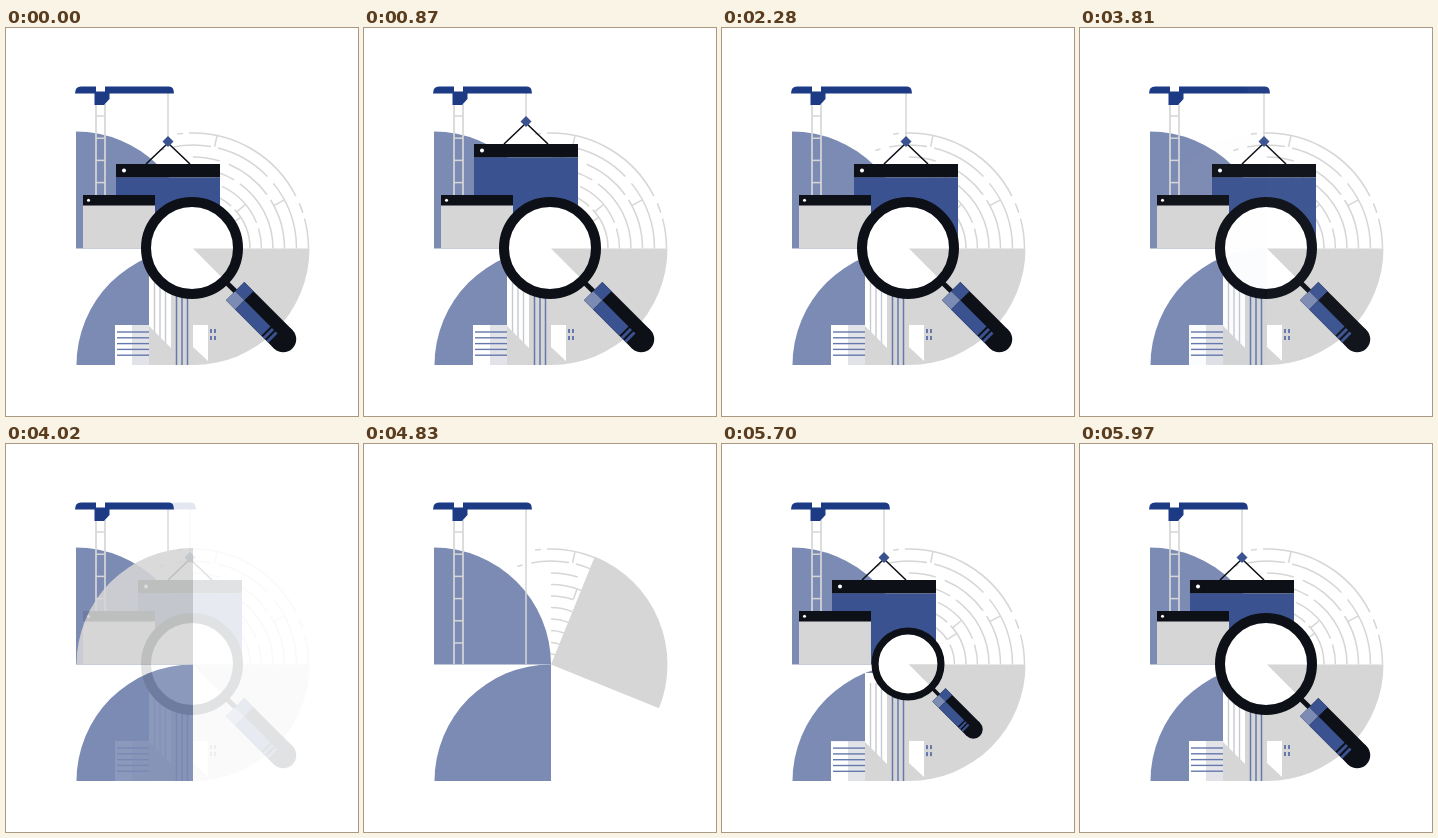
Recreate the animation shown at these times as an HTML page with a canvas. Size 352 by 388 pixels, loop 6.06 s.

```html
<!DOCTYPE html>
<html lang="en">
<head>
<meta charset="utf-8">
<title>Building site</title>
<style>
html, body { margin: 0; width: 100%; height: 100%; overflow: hidden; background: #fff; }
canvas { display: block; }
</style>
</head>
<body>
<canvas id="stage" width="352" height="388"></canvas>
<script>
const W = 352, H = 388, LOOP = 6060;
const PALE = '#7c8bb3', BLUE = '#3a5290', NAVY = '#1d3b85', INK = '#0e1018', GRAY = '#d6d6d6', WHITE = '#fff';
const HUB = { x: 187, y: 220.5 };
const DEG = Math.PI / 180;

const makeLayer = () => Object.assign(document.createElement('canvas'), { width: W, height: H }).getContext('2d');
const stage = document.getElementById('stage').getContext('2d');
const fading = makeLayer(), moving = makeLayer();

const clamp = v => Math.max(0, Math.min(1, v));
const span = (t, from, to) => clamp((t - from) / (to - from));
const smooth = p => (1 - Math.cos(Math.PI * p)) / 2;
const settle = p => smooth(1 - (1 - p) ** 2);
const mix = (a, b, p) => a + (b - a) * p;

function rect(c, color, x, y, w, h) {
  c.fillStyle = color;
  c.fillRect(x, y, w, h);
}

function poly(c, color, ...points) {
  c.fillStyle = color;
  c.beginPath();
  points.forEach(([x, y]) => c.lineTo(x, y));
  c.fill();
}

function line(c, color, width, ...points) {
  c.strokeStyle = color;
  c.lineWidth = width;
  c.beginPath();
  points.forEach(([x, y]) => c.lineTo(x, y));
  c.stroke();
}

function disc(c, color, x, y, r) {
  c.fillStyle = color;
  c.beginPath();
  c.arc(x, y, r, 0, 7);
  c.fill();
}

// Angles are degrees clockwise from straight up.
function sector(c, color, x, y, r, from, to) {
  c.fillStyle = color;
  c.beginPath();
  c.moveTo(x, y);
  c.arc(x, y, r, (from - 90) * DEG, (to - 90) * DEG);
  c.fill();
}

function clipped(c, x, y, w, h, draw) {
  c.save();
  c.beginPath();
  c.rect(x, y, w, h);
  c.clip();
  draw();
  c.restore();
}

const RINGS = [
  [115.5, [-8, -5], [-2, 63], [67, 72], [75, 90]],
  [103.5, [-19, -16], [-11, 10], [14, 46], [51, 90]],
  [91.5, [0, 17], [23, 54], [58, 90]],
  [80, [0, 31], [36, 90]],
  [68.5, [0, 19], [25, 68], [73, 90]],
  [57, [0, 42], [47, 90]],
  [45.5, [0, 57], [64, 90]],
  [34, [0, 35], [42, 90]],
  [22, [0, 90]],
  [10.5, [0, 30]]
];
const WALLS = [[104, 115, 12], [92, 103, 62], [69, 80, 19], [57, 68, 50], [46, 57, 57]];

function maze(c, limit) {
  c.strokeStyle = GRAY;
  c.lineWidth = 1.5;
  for (const [r, ...parts] of RINGS) {
    for (const [from, to] of parts) {
      if (from >= limit) continue;
      c.beginPath();
      c.arc(HUB.x, HUB.y, r, (from - 90) * DEG, (Math.min(to, limit) - 90) * DEG);
      c.stroke();
    }
  }
  for (const [inner, outer, angle] of WALLS) {
    if (angle > limit) continue;
    const s = Math.sin(angle * DEG), k = Math.cos(angle * DEG);
    line(c, GRAY, 1.5, [HUB.x + inner * s, HUB.y - inner * k], [HUB.x + outer * s, HUB.y - outer * k]);
  }
}

function mast(c) {
  for (const x of [90, 99]) line(c, GRAY, 1.7, [x, 76], [x, 220]);
  for (let i = 0; i < 6; i++) {
    const y = 88 + i * 22.2;
    line(c, GRAY, 1.5, [90, y], [99, y]);
  }
}

function jib(c, slide) {
  const end = 168 + slide;
  c.fillStyle = NAVY;
  c.beginPath();
  c.moveTo(69, 65.5);
  c.quadraticCurveTo(69, 58.5, 75, 58.5);
  c.lineTo(end - 5, 58.5);
  c.quadraticCurveTo(end, 58.5, end, 65.5);
  c.fill();
  rect(c, WHITE, 90, 57, 9, 6.5);
  poly(c, NAVY, [88.5, 65], [103.5, 65], [103.5, 71], [98, 77], [88.5, 77]);
}

function load(c, x, y) {
  line(c, INK, 1.6, [x - 22, y], [x, y - 21], [x + 22, y]);
  poly(c, BLUE, [x, y - 28], [x + 5.5, y - 22.5], [x, y - 17], [x - 5.5, y - 22.5]);
  rect(c, INK, x - 52, y, 104, 13.5);
  rect(c, BLUE, x - 52, y + 13.5, 104, 70.5);
  disc(c, WHITE, x - 44, y + 6.5, 2);
}

// Averages several positions so that a fast load smears along its path.
function smearedLoad(c, x, y, shift) {
  if (Math.abs(shift) < 1) return load(c, x, y);
  const n = 8;
  moving.clearRect(0, 0, W, H);
  moving.globalCompositeOperation = 'lighter';
  moving.globalAlpha = 1 / n;
  for (let i = 0; i < n; i++) load(moving, x, y + shift * (i / (n - 1) - .5));
  moving.globalAlpha = 1;
  moving.globalCompositeOperation = 'source-over';
  c.drawImage(moving.canvas, 0, 0);
}

function panel(c, y) {
  rect(c, GRAY, 77, y + 10, 72, 60);
  rect(c, INK, 77, y, 72, 10.5);
  disc(c, WHITE, 82.5, y + 5.3, 1.5);
}

function tower(c, y) {
  rect(c, WHITE, 143, y, 22, 130);
  rect(c, GRAY, 165, y, 22, 130);
  for (const x of [148.5, 154, 159.5]) line(c, '#c6c9d2', 1.4, [x, y + 10], [x, 337]);
  for (const x of [170.5, 176, 181.5]) line(c, '#6579ab', 1.5, [x, y + 10 + (x < 172 ? 7 : 0)], [x, 337]);
}

function houses(c, y) {
  poly(c, GRAY, [142, y], [166, y + 24], [166, y + 42], [142, y + 42]);
  rect(c, WHITE, 109, y, 17, 42);
  rect(c, '#e2e3e8', 126, y, 17, 42);
  for (let i = 0; i < 5; i++) line(c, '#6579ab', 1.4, [111, y + 7 + i * 5.8], [143, y + 7 + i * 5.8]);
  poly(c, WHITE, [187, y], [202, y], [202, y + 36], [187, y + 22]);
  for (const x of [204, 208]) for (const dy of [4, 11]) rect(c, '#6579ab', x, y + dy, 2, 4);
}

function magnifier(c, size) {
  if (size <= 0) return;
  c.save();
  c.translate(186, 220);
  c.scale(size, size);
  disc(c, WHITE, 0, 0, 46);
  sector(c, GRAY, 1, .5, 42, 90, 135);
  c.strokeStyle = INK;
  c.lineWidth = 10;
  c.beginPath();
  c.arc(0, 0, 46, 0, 7);
  c.stroke();
  c.rotate(45 * DEG);
  rect(c, INK, 49, -2.5, 13, 5);
  rect(c, INK, 61, -13, 68, 26);
  disc(c, INK, 129, 0, 13);
  rect(c, BLUE, 61, -13, 13, 13);
  rect(c, PALE, 61, 0, 13, 13);
  rect(c, BLUE, 74, 0, 37, 13);
  rect(c, BLUE, 113, 0, 3, 13);
  rect(c, BLUE, 118, 0, 3, 13);
  c.restore();
}

function scene(c, s) {
  rect(c, WHITE, 0, 0, W, H);
  sector(c, PALE, 70, 220.5, 117, 0, 90);
  sector(c, PALE, 187, 337, 116.5, 270, 360);
  mast(c);
  const x = 162 + s.slide;
  line(c, GRAY, 1.5, [x, 65], [x, Math.min(220, s.loadY - 24)]);
  maze(c, s.turn - 90);
  sector(c, GRAY, HUB.x, HUB.y, 116.5, s.turn - 90, s.turn);
  jib(c, s.slide);
  clipped(c, 0, 0, W, 220.5, () => {
    smearedLoad(c, x, s.loadY, s.smear);
    panel(c, s.panelY);
  });
  clipped(c, 0, 0, W, 337, () => {
    tower(c, s.towerY);
    houses(c, s.houseY);
  });
  magnifier(c, s.lens);
}

function working(t) {
  const lift = smooth(span(t, 330, 960)) - smooth(span(t, 1920, 2280));
  return {
    slide: 22 * smooth(span(t, 1200, 1650)),
    loadY: 136 - 21 * lift,
    smear: 0, turn: 180, panelY: 167, towerY: 229, houseY: 297, lens: 1
  };
}

function building(t) {
  const loadAt = time => mix(249, 136, settle(span(time, 5250, 5730)));
  return {
    slide: 0,
    loadY: loadAt(t),
    smear: loadAt(t + 8) - loadAt(t - 8),
    turn: 180 * smooth(span(t, 4090, 5370)),
    panelY: mix(221, 167, settle(span(t, 5040, 5400))),
    towerY: mix(338, 229, settle(span(t, 5070, 5430))),
    houseY: mix(338, 297, settle(span(t, 5310, 5790))),
    lens: settle(span(t, 5520, 5970))
  };
}

function draw(t) {
  if (t < 3780) return scene(stage, working(t));
  scene(stage, building(t));
  const left = 1 - smooth(span(t, 3780, 4090));
  if (left > 0) {
    scene(fading, working(t));
    stage.globalAlpha = left;
    stage.drawImage(fading.canvas, 0, 0);
    stage.globalAlpha = 1;
  }
}

const start = performance.now();
function tick() {
  draw((performance.now() - start) % LOOP);
  requestAnimationFrame(tick);
}
tick();
</script>
</body>
</html>
```
